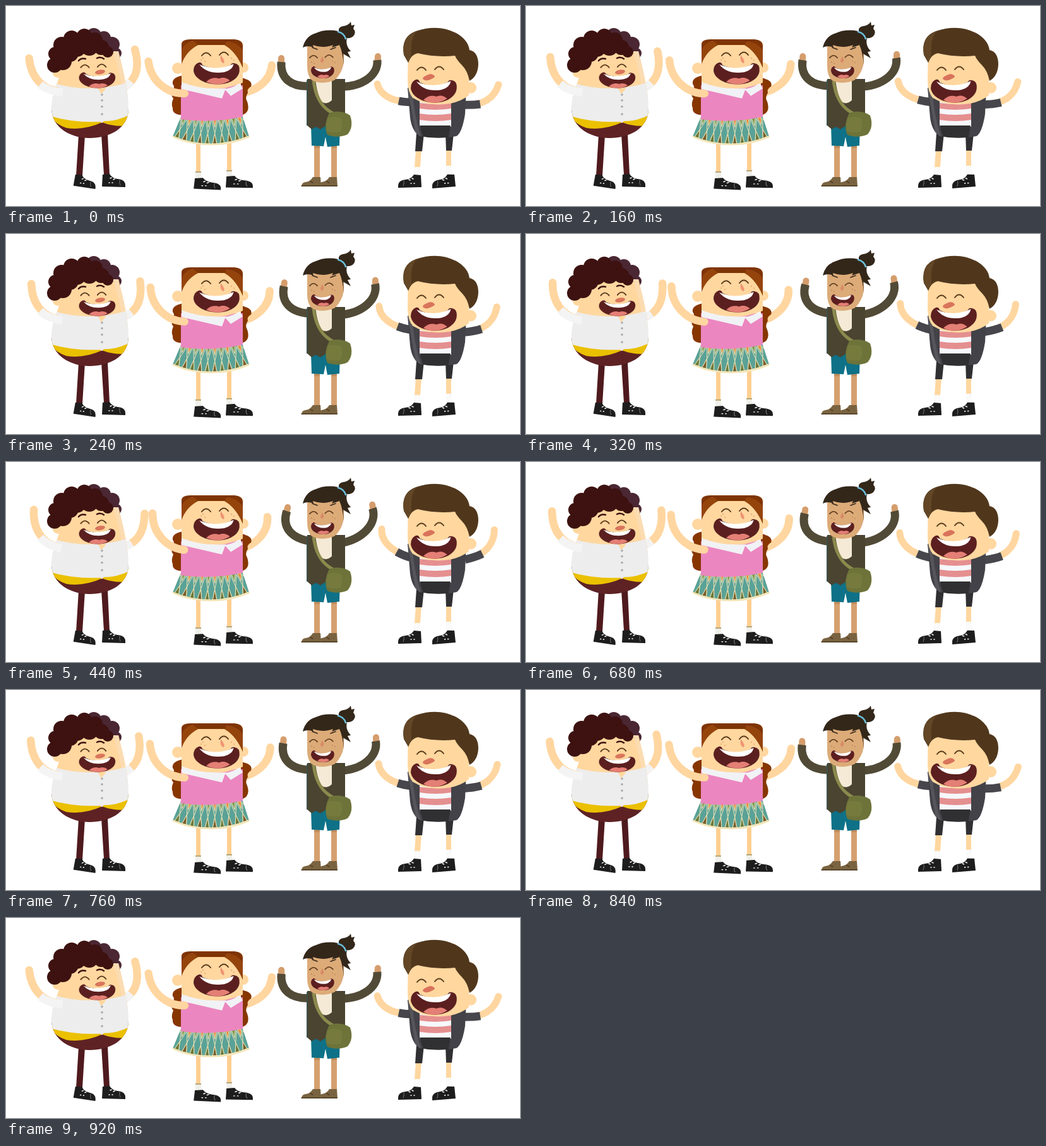
An HTML page that plays this animation: 814x318 px, repeating every 0.96 s.

```html
<!DOCTYPE html>
<html lang="en">
<head>
<meta charset="utf-8">
<title>Cheering friends</title>
<style>
  html, body { margin: 0; width: 100%; height: 100%; overflow: hidden; background: #fff; }
  svg { display: block; width: 814px; height: 318px; --k: 0; }
  .sway { transform: rotate(calc(var(--a) * var(--k) * 1deg)); }
  .line { fill: none; stroke-linecap: round; stroke-linejoin: round; }
  .limb { fill: none; stroke: #ffd6a0; stroke-width: 12.4; stroke-linecap: round; }
  .thin { stroke-width: 11; }
  .tan { stroke: #d59d6c; stroke-width: 10; }
  .sleeve { fill: none; stroke-width: 13; }
  .skin { fill: #ffd79f; }
  .eye { fill: none; stroke: #5b3a1c; stroke-width: 2; stroke-linecap: round; }
</style>
</head>
<body>
<svg viewBox="0 0 814 318">
  <defs>
    <g id="mouth">
      <path fill="#5c1f1f" d="M8 0Q0 3 0 13C2 26 20 34 38 34C56 34 71 25 72 13Q73 2 64 1Q60 0 58 4Q36 14 14 4Q13-1 8 0Z"/>
      <path fill="#fff" d="M9 3Q36 14 63 2Q61 12 48 15Q22 19 9 3Z"/>
      <path fill="#e47f76" d="M20 30Q29 21 40 25Q49 21 57 28Q47 34 38 34Q28 34 20 30Z"/>
    </g>
    <g id="shoe">
      <path fill="#1d1d1d" d="M1 1L12 0Q16 7 25 8Q37 9 37 18V21L0 20Z"/>
      <path class="line" stroke="#fff" stroke-width="1.6" d="M11 14h1M16 14h1M13 7l2-1M18 9l2-1"/>
      <path class="line" stroke="#777" d="M28 10Q27 14 29 18"/>
    </g>
    <path id="eyes" class="eye" d="M-7 3Q0-6 7 3M21 2Q28-7 35 2"/>
    <path id="boot" fill="#7a6340" d="M30 0H18Q14 7 6 8Q0 9 0 15H31Z"/>
    <clipPath id="pear"><path d="M97 72C92 100 72 136 72 162C72 195 105 210 132 210C162 210 194 196 194 163C194 136 186 104 178 72Z"/></clipPath>
    <clipPath id="skirtShape"><path d="M278 174H374L385 208Q355 221 325 221Q292 221 264 208Z"/></clipPath>
    <clipPath id="coat"><path d="M636 130H729L727 172Q722 203 713 207Q685 212 656 207Q643 200 640 178Z"/></clipPath>
  </defs>

  <!-- Curly hair, yellow shirt hem -->
  <g>
    <g class="sway" style="--a:17;transform-origin:168px 128px">
      <path class="limb" d="M182 132C202 122 214 104 204 69"/>
      <path class="sleeve" stroke="#f3f3f3" d="M178 134Q190 129 198 120"/>
    </g>
    <path fill="#4f1a1d" d="M115 205H125L121 270H111ZM151 204H161L164 268H155Z"/>
    <use href="#shoe" transform="translate(109 267) rotate(7) scale(.95)"/>
    <use href="#shoe" transform="translate(152 267)"/>
    <g fill="#4a2733">
      <circle cx="139" cy="47" r="12"/><circle cx="155" cy="51" r="11"/><circle cx="168" cy="61" r="12"/><circle cx="174" cy="75" r="9"/>
    </g>
    <g clip-path="url(#pear)">
      <path class="skin" d="M60 60H200V150H60Z"/>
      <path fill="#fbdcb2" d="M170 72L194 72V135H185Q180 104 170 72Z"/>
      <path fill="#5e2224" d="M60 165H200V215H60Z"/>
      <path fill="#ebc000" d="M70 172L152 181L196 168V190Q172 193 152 185Q124 198 96 194Q80 189 72 177Z"/>
      <path fill="#ededed" d="M60 118L80 124Q135 139 192 122L200 171Q175 184 155 183L152 186L149 184Q105 186 70 175Z"/>
      <path class="skin" d="M145 130H159L151 140Z"/>
    </g>
    <g fill="#aaa"><circle cx="152" cy="141" r="1.8"/><circle cx="152" cy="150" r="1.8"/><circle cx="152" cy="160" r="1.8"/><circle cx="152" cy="172" r="1.8"/></g>
    <circle class="skin" cx="82" cy="106" r="8"/>
    <g fill="#3d1210">
      <circle cx="77" cy="94" r="12"/><circle cx="78" cy="76" r="11"/><circle cx="88" cy="62" r="13"/><circle cx="104" cy="52" r="13"/>
      <circle cx="124" cy="48" r="12"/><circle cx="141" cy="54" r="12"/><circle cx="151" cy="66" r="12"/><circle cx="161" cy="73" r="9"/>
      <circle cx="112" cy="66" r="15"/><circle cx="132" cy="65" r="14"/><circle cx="90" cy="88" r="14"/><circle cx="101" cy="75" r="14"/>
    </g>
    <path class="line" stroke="#3d1210" stroke-width="2.5" d="M115 87Q119 82 126 84M144 83Q150 80 155 84"/>
    <use href="#eyes" transform="translate(125 95) scale(.95)"/>
    <ellipse cx="149" cy="105" rx="8" ry="3.5" fill="#d9765c" transform="rotate(-10 149 105)"/>
    <use href="#mouth" transform="translate(115.500 105.500) scale(.8 .74)"/>
    <g class="sway" style="--a:9.6;transform-origin:85px 125px">
      <path class="limb" d="M80 135C60 132 40 116 36.500 83"/>
      <path class="sleeve" stroke="#f4f4f4" d="M90 137Q68 136 54 125"/>
    </g>
  </g>

  <!-- Long hair, patterned skirt -->
  <g>
    <g class="sway" style="--a:-8.4;transform-origin:370px 139px">
      <path class="limb" d="M370 139C395 136 419 120 421 94"/>
    </g>
    <path fill="#873600" d="M282 110Q262 113 264 124Q268 128 264 134Q260 142 265 147Q261 156 264 162Q263 174 282 173ZM372 114Q392 118 388 128Q381 132 383 138Q378 146 382 152Q388 170 372 174Z"/>
    <path fill="#ffcf92" d="M301 215H308V266H301ZM350 215H357V264H350Z"/>
    <path fill="#f0f0ea" d="M300 263H309V275H300ZM349 263H358V272H349Z"/>
    <path fill="#b5a575" d="M300 263H309V265H300ZM349 261H358V263H349Z"/>
    <use href="#shoe" transform="translate(298 273) scale(1.16 .88) rotate(2)"/>
    <use href="#shoe" transform="translate(348 270) scale(1.16 .92)"/>
    <g id="skirt" clip-path="url(#skirtShape)" stroke="#f3e5b8"><path fill="#5aa297" d="M260 170H390V225H260Z"/></g>
    <path class="line" stroke="#f3e5b8" stroke-width="3" d="M265 208Q292 220 325 220Q355 220 384 208"/>
    <path fill="#ec86c0" d="M277 126H375V176Q326 187 277 180Z"/>
    <circle class="skin" cx="272" cy="99" r="9"/><circle class="skin" cx="376" cy="98" r="8"/>
    <path class="skin" d="M278 58H375V122Q327 142 278 122Z"/>
    <path fill="#f1f2f5" d="M278 121Q306 133 348 131L342 147L278 132ZM346 132Q360 130 370 123L375 131L356 143Z"/>
    <path fill="#7f3404" d="M278 92V60Q279 53 292 53H362Q374 54 375 62V98Q364 72 346 62H304Q285 72 278 92Z"/>
    <path fill="#95440c" d="M278 92Q285 72 304 62L296 55Q279 60 278 74ZM346 62Q364 72 375 98V70Q366 58 350 56Z"/>
    <use href="#eyes" transform="translate(317 76)"/>
    <path fill="#ef9474" d="M340 78Q338 90 345 91Q348 88 340 78Z"/>
    <g fill="#e0a066"><circle cx="309" cy="86" r="1"/><circle cx="315" cy="88" r="1"/><circle cx="312" cy="83" r="1"/><circle cx="357" cy="83" r="1"/><circle cx="361" cy="86" r="1"/></g>
    <use href="#mouth" transform="translate(297 90) scale(1.010 1.020)"/>
    <g class="sway" style="--a:7.8;transform-origin:277px 134px">
      <path class="limb" d="M283 139C254 140 229 118 225.500 88"/>
    </g>
  </g>

  <!-- Hair bun, shoulder bag -->
  <g>
    <g class="sway" style="--a:13.5;transform-origin:488px 121px">
      <path class="limb tan" d="M436 95V83"/>
      <path class="sleeve" stroke="#514a36" d="M488 127C450 131 434 114 436 89"/>
    </g>
    <g class="sway" style="--a:-13.5;transform-origin:532px 112px">
      <path class="limb tan" d="M588 95L589 80"/>
      <path class="sleeve" stroke="#514a36" d="M526 128C562 130 590 111 588 86"/>
    </g>
    <path fill="#d5a06f" d="M488 220H497V276H488ZM515 220H524V274H515Z"/>
    <path fill="#c48d5d" d="M488 220H497V226H488ZM515 220H524V226H515Z"/>
    <use href="#boot" transform="translate(468 272)"/>
    <use href="#boot" transform="translate(494 272)"/>
    <path class="line" stroke="#4f3f28" stroke-width="1.5" d="M468 286H498M500 286H524M482 279l4 2M508 279l4 2"/>
    <path fill="#0e7187" d="M483 190H529L528 222L509 224L506 208L503 223L484 222Z"/>
    <path fill="#4a4431" d="M477 116H537V196L532 193L526 197L506 191L498 196L490 192L484 196L477 190Z"/>
    <path fill="#3c5149" d="M476 118H478V190H476Z"/>
    <path fill="#f4ead6" d="M490 117H516V150Q507 158 500 152Q493 142 490 117Z"/>
    <path class="line" stroke="#8b8a4c" stroke-width="5" style="stroke-linecap:butt" d="M487 119Q492 160 521 172L538 176"/>
    <path fill="#6d7339" d="M512 170Q530 164 545 174Q551 192 541 204Q526 211 509 205Q502 190 512 170Z"/>
    <path fill="#767a3d" d="M510 178Q520 174 531 179Q534 190 530 200Q519 203 508 199Q506 188 510 178Z"/>
    <path fill="#dcab78" d="M477 56H535V90Q532 108 520 118Q500 126 484 118Q477 110 477 96Z"/>
    <path fill="#33271a" d="M470 66Q474 48 491 43Q507 36 526 40L540 52Q537 62 546 72L541 73L546 83L534 76L535 94Q533 72 528 62L516 66L518 62Q502 68 486 62L487 66Q478 62 470 66Z"/>
    <path fill="#33271a" d="M528 43Q524 34 534 32Q542 31 546 25L547 31L552 30L550 36Q556 42 549 49Q542 53 536 50Z"/>
    <path class="line" stroke="#6bc1dd" stroke-width="2.5" d="M526 41Q535 43 538 52"/>
    <path class="line" stroke="#33271a" stroke-width="1.5" d="M485 66L493 69M514 69L522 66"/>
    <use href="#eyes" transform="translate(487 80) scale(.88 .8)"/>
    <path fill="#d98a68" d="M501 80Q496 88 500 90Q506 89 501 80Z"/>
    <g fill="#bf8850"><circle cx="484" cy="89" r=".9"/><circle cx="488" cy="91" r=".9"/><circle cx="517" cy="88" r=".9"/><circle cx="521" cy="90" r=".9"/></g>
    <use href="#mouth" transform="translate(483 96) scale(.51 .56)"/>
  </g>

  <!-- Striped shirt, dark jacket -->
  <g>
    <g class="sway" style="--a:18.5;transform-origin:646px 137px">
      <path class="limb thin" d="M640 152C610 153 592 140 588 124"/>
      <path class="sleeve" stroke="#46464c" d="M645 153Q632 153 622 151"/>
    </g>
    <g class="sway" style="--a:-17;transform-origin:718px 139px">
      <path class="limb thin" d="M725 157C758 159 774 144 780 125"/>
      <path class="sleeve" stroke="#46464c" d="M722 157Q738 158 751 156"/>
    </g>
    <path class="skin" d="M649 228H658L656 256H647ZM697 228H705V256H697Z"/>
    <path fill="#fafafa" d="M646 256H656V270H646ZM697 254H706V270H697Z"/>
    <path fill="#303033" d="M650 202H662L659 231H648ZM696 202H709L706 230H697Z"/>
    <use href="#shoe" transform="translate(658 268) scale(-1 1)"/>
    <use href="#shoe" transform="translate(711 267) scale(-1 1) rotate(3)"/>
    <g clip-path="url(#coat)">
      <path fill="#424248" d="M630 128H740V212H630Z"/>
      <path fill="#55555b" d="M636 130H643Q646 175 658 210H650Z"/>
      <path fill="#f6f8fb" d="M655 140H705V192H655Z"/>
      <path fill="#e58f90" d="M655 154Q680 158 705 154V163Q680 167 655 163ZM655 171Q680 175 705 171V181Q680 185 655 181Z"/>
      <path fill="#303033" d="M655 190H704L700 212H662Z"/>
    </g>
    <circle class="skin" cx="736" cy="130" r="9"/>
    <path class="skin" d="M637 66H733V142Q722 151 704 155Q668 161 644 146Q636 136 636 118Z"/>
    <path fill="#50371c" d="M630 78Q625 49 649 40Q684 28 713 43Q732 54 734 70Q748 73 748 93Q747 112 734 119Q731 103 722 94Q714 86 711 79Q680 82 652 75Q642 77 637 90Z"/>
    <path fill="#624626" d="M630 76Q626 49 650 40Q640 52 642 78L637 90Z"/>
    <use href="#eyes" transform="translate(658 99)"/>
    <path fill="#d9735b" d="M672 108Q659 112 660 116Q666 122 679 113Q679 109 672 108Z"/>
    <use href="#mouth" transform="translate(641 117) scale(1.010 1.080)"/>
  </g>
</svg>
<script>
  const LOOP = 960, STEP = 40, COLS = 10;
  const svg = document.querySelector('svg');
  const skirt = document.getElementById('skirt');

  // u runs across the skirt, v from waist to hem
  function point(u, v) {
    const x = 278 + 96 * u + v * (25 * u - 14);
    const y = 177 + v * (31 + 13 * Math.sin(Math.PI * u));
    return x.toFixed(1) + ',' + y.toFixed(1);
  }

  function patch(fill, ...corners) {
    const p = document.createElementNS(svg.namespaceURI, 'polygon');
    p.setAttribute('fill', fill);
    p.setAttribute('points', corners.map(([c, v]) => point(c / COLS, v)).join(' '));
    skirt.append(p);
  }

  for (let c = 0; c <= COLS; c++) {
    const m = c + .5;
    patch(c % 2 ? '#e8913f' : '#7d9a52', [c + .15, 0], [c + .85, 0], [m, .36]);
    patch('#5aa297', [c, .06], [c + .5, .58], [c + .2, 1], [c - .2, 1], [c - .5, .58]);
    patch(c % 2 ? '#75602f' : '#6b7a3c', [m, .58], [m + .3, 1], [m - .3, 1]);
  }

  function draw(now) {
    const t = Math.floor(now % LOOP / STEP) * STEP;
    svg.style.setProperty('--k', ((1 - Math.cos(2 * Math.PI * t / LOOP)) / 2).toFixed(4));
    requestAnimationFrame(draw);
  }
  requestAnimationFrame(draw);
</script>
</body>
</html>
```
